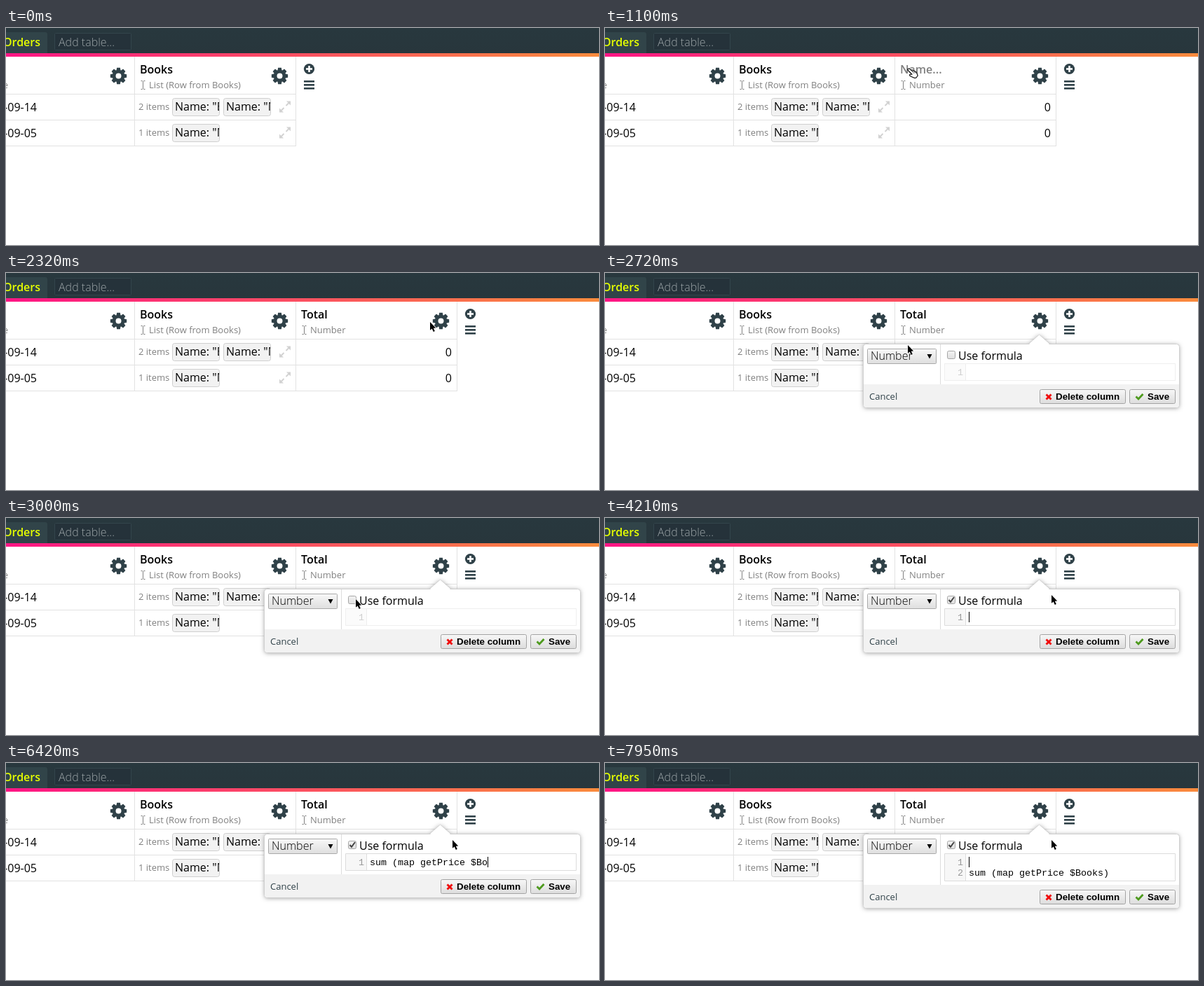
Write an HTML page with a canvas that moves like this. It is 846 px wide and 310 px high and loops after 8000 ms.

```html
<!DOCTYPE html>
<html lang="en">
<head>
<meta charset="utf-8">
<title>Adding a formula column</title>
<style>
html, body { margin: 0; width: 100%; height: 100%; overflow: hidden; background: #fff; }
canvas { display: block; }
</style>
</head>
<body>
<canvas id="stage" width="846" height="310"></canvas>
<script>
const ctx = document.getElementById('stage').getContext('2d');
const LOOP = 8000, DARK = '#2f4148', GRAY = '#808080';
const FORMULA = 'sum (map getPrice $Books)';
const sans = (size, weight = 400) => `${weight} ${size}px "Open Sans", sans-serif`;
const MONO = '13.33px "Liberation Mono", monospace';
const BUTTON = 'bold 13.33px "Liberation Sans", sans-serif';

// [first key, last key, characters]
const TITLE_KEYS = [[1620, 1840, 5]];
const FORMULA_KEYS = [
  [4450, 4700, 5], [4850, 4980, 4], [5240, 5800, 9], [6010, 6010, 1],
  [6270, 6420, 2], [6480, 6590, 3], [6730, 6730, 1]
];
const WORD_STOPS = [24, 19, 18, 9, 5, 4, 0];

// [time, x, y, shape from here on]
const POINTER = [
  [400, 440, 52, 'hand'], [480, 425, 47, 'hand'], [740, 425, 47, 'hand'],
  [820, 431, 57, 'hand'], [1100, 431, 57, 'hand'], [1160, 437, 58, 'beam'],
  [1240, 449, 60, 'beam'], [2010, 449, 60, 'beam'], [2080, 472, 64, 'arrow'],
  [2320, 605, 70, 'arrow'], [2380, 616, 69, 'hand'], [2530, 616, 69, 'hand'],
  [2580, 590, 80, 'arrow'], [2790, 355, 114, 'arrow'], [3000, 499, 116, 'arrow'],
  [3080, 495, 116, 'arrow'], [3260, 495, 116, 'arrow'], [3350, 519, 132, 'beam'],
  [3480, 555, 141, 'beam'], [3690, 555, 141, 'beam'], [3770, 580, 129, 'arrow'],
  [3950, 637, 110, 'arrow']
];

function typed(groups, t) {
  let n = 0;
  for (const [from, to, count] of groups) {
    if (t < from) break;
    n += t >= to ? count : 1 + Math.floor((t - from) / (to - from) * (count - 1));
  }
  return n;
}

function rect(x, y, w, h, color) {
  ctx.fillStyle = color;
  ctx.fillRect(x, y, w, h);
}

function box(x, y, w, h, r, fill, stroke) {
  ctx.beginPath();
  ctx.roundRect(x + .5, y + .5, w - 1, h - 1, r);
  ctx.fillStyle = fill;
  ctx.fill();
  ctx.strokeStyle = stroke;
  ctx.lineWidth = 1;
  ctx.stroke();
}

function text(str, x, y, font, color = '#000', align = 'left') {
  ctx.font = font;
  ctx.fillStyle = color;
  ctx.textAlign = align;
  ctx.fillText(str, x, y);
}

function trace(points, close) {
  ctx.beginPath();
  for (let i = 0; i < points.length; i += 2) ctx.lineTo(points[i], points[i + 1]);
  if (close) ctx.closePath();
}

function line(points, color, width) {
  trace(points);
  ctx.strokeStyle = color;
  ctx.lineWidth = width;
  ctx.stroke();
}

function shade(y, h, top, bottom) {
  const g = ctx.createLinearGradient(0, y, 0, y + h);
  g.addColorStop(0, top);
  g.addColorStop(1, bottom);
  return g;
}

function gear(x, y) {
  ctx.save();
  ctx.translate(x, y);
  ctx.fillStyle = DARK;
  ctx.beginPath();
  for (let i = 0; i < 8; i++) {
    const a = i * Math.PI / 4;
    for (const [r, d] of [[8.8, -.34], [11.9, -.2], [11.9, .2], [8.8, .34]])
      ctx.lineTo(r * Math.cos(a + d), r * Math.sin(a + d));
  }
  ctx.closePath();
  ctx.moveTo(4, 0);
  ctx.arc(0, 0, 4, 0, 7);
  ctx.fill('evenodd');
  ctx.restore();
}

function typeIcon(x) {
  line([x - 3, 75.5, x - 1, 75.5, x, 76.5, x + 1, 75.5, x + 3, 75.5], GRAY, 1);
  line([x, 76, x, 87], GRAY, 1);
  line([x - 3, 87.5, x - 1, 87.5, x, 86.5, x + 1, 87.5, x + 3, 87.5], GRAY, 1);
}

function expandIcon(x, y) {
  ctx.fillStyle = '#d2d2d2';
  for (const s of [1, -1]) {
    trace([x + 8 * s, y - 8 * s, x + 8 * s, y - 2 * s, x + 2 * s, y - 8 * s], true);
    ctx.fill();
    line([x + 1.5 * s, y - 1.5 * s, x + 6 * s, y - 6 * s], '#d2d2d2', 2);
  }
}

function chip(x, y, label) {
  box(x, y, 68, 26, 3, '#f2f2f2', '#cfcfcf');
  ctx.save();
  ctx.beginPath();
  ctx.rect(x, y, 67, 26);
  ctx.clip();
  text(label, x + 4, y + 18, sans(16));
  ctx.restore();
}

function topBar() {
  rect(0, 0, 846, 36, shade(0, 36, '#28383e', '#28363c'));
  ctx.beginPath();
  ctx.roundRect(-10, 6, 69, 30, [0, 3, 0, 0]);
  ctx.fillStyle = '#314449';
  ctx.fill();
  text('Orders', 49, 26, sans(16, 600), '#e6ff00', 'right');
  box(69, 7, 110, 25, 1, '#25323a', '#33454c');
  text('Add table...', 75, 26, sans(16, 300), '#9aa3a6');
  const g = ctx.createLinearGradient(0, 0, 846, 0);
  g.addColorStop(0, '#ff1585');
  g.addColorStop(1, '#fb8b3c');
  rect(0, 36, 846, 5, g);
}

function table(added) {
  const right = added ? 643 : 413;
  for (const y of [94, 131, 168]) rect(0, y, right + 1, 1, '#e2e2e2');
  for (const x of [183, 413, 643]) if (x <= right) rect(x, 41, 1, 128, '#e2e2e2');

  text('Date', 3, 86, sans(13), GRAY, 'right');
  text('-09-14', 44, 119, sans(16), '#000', 'right');
  text('-09-05', 44, 156, sans(16), '#000', 'right');
  gear(160.5, 68.5);

  text('Books', 191, 65, sans(16, 600));
  typeIcon(195.5);
  text('List (Row from Books)', 204, 86, sans(13), GRAY);
  gear(390.5, 68.5);
  text('2 items', 189, 117, sans(13), GRAY);
  text('1 items', 189, 154, sans(13), GRAY);
  chip(237, 100, 'Name: "B');
  chip(310, 100, 'Name: "M');
  chip(237, 137, 'Name: "M');
  expandIcon(398, 112.5);
  expandIcon(398, 149.5);

  const x = right + 19.5;
  ctx.beginPath();
  ctx.arc(x, 58.5, 7.6, 0, 7);
  ctx.fillStyle = DARK;
  ctx.fill();
  rect(x - 4.5, 57.2, 9, 2.6, '#fff');
  rect(x - 1.3, 54, 2.6, 9, '#fff');
  for (const y of [75, 80, 85]) rect(x - 7.5, y, 15, 2.6, DARK);
}

function newColumn(t) {
  const title = 'Total'.slice(0, typed(TITLE_KEYS, t));
  text(title || 'Name...', 421, 65, sans(16, 600), title ? '#000' : GRAY);
  if (t >= 1460 && t < 2010) {
    ctx.strokeStyle = 'rgba(229,151,0,.8)';
    ctx.lineWidth = 2;
    ctx.strokeRect(420, 47, 172, 24);
    rect(421 + (title ? Math.round(ctx.measureText(title).width) : 0), 48, 1, 22, '#000');
  }
  typeIcon(425.5);
  text('Number', 434, 86, sans(13), GRAY);
  gear(620.5, 68.5);
  for (const y of [119, 156]) text('0', 636, y, sans(16), '#000', 'right');
}

function button(x, y, w, label, labelX) {
  box(x, y, w, 21, 2, shade(y, 21, '#f8f8f8', '#dcdcdc'), '#a3a3a3');
  text(label, labelX, y + 15, BUTTON);
}

function editor(t, grow) {
  const on = t >= 3260;
  ctx.globalAlpha = on ? 1 : .45;
  box(484, 129, 330, 25 + grow, 0, '#fff', '#dcdcdc');
  rect(485, 130, 30, 23 + grow, '#f7f7f7');
  rect(514, 130, 1, 23 + grow, '#ddd');
  text('1', 511, 146, MONO, '#999', 'right');
  if (grow) text('2', 511, 161, MONO, '#999', 'right');
  ctx.globalAlpha = 1;

  const n = typed(FORMULA_KEYS, t);
  text(FORMULA.slice(0, n), 519, 146 + grow, MONO);
  if (t < 4210 || (t >= 6990 && t < 7140)) return;
  const stop = Math.min(6, Math.floor((t - 7140) / 71.6));
  const col = t < 7140 ? n : WORD_STOPS[stop];
  rect(519 + col * 8, t >= 7710 && t < 7950 ? 149 : 134, 1, 15, '#000');
}

function checkbox(t) {
  const on = t >= 3260;
  box(488, 111, 12, 12, 2, shade(111, 12, '#f4f4f4', '#dedede'), '#a5a5a5');
  if (on) line([490.5, 117, 493, 119.8, 498, 113], '#444', 2);
  if (on && t < 3690) {
    ctx.strokeStyle = 'rgba(229,151,0,.8)';
    ctx.lineWidth = 1;
    ctx.strokeRect(487.5, 110.5, 13, 13);
  }
}

function popup(t) {
  const grow = t >= 7710 ? 15 : 0, foot = 159 + grow;
  ctx.save();
  ctx.beginPath();
  ctx.roundRect(369, 101.5, 450, 90.5 + grow, 4);
  ctx.moveTo(604, 102);
  ctx.lineTo(619.5, 88);
  ctx.lineTo(635, 102);
  ctx.shadowColor = 'rgba(0,0,0,.4)';
  ctx.shadowBlur = 6;
  ctx.shadowOffsetY = 1;
  ctx.fillStyle = '#fff';
  ctx.fill();
  ctx.restore();
  box(368, 101, 452, 92 + grow, 4, '#fff', '#d0d0d0');
  ctx.fillStyle = '#fff';
  trace([604, 103, 619.5, 88.5, 635, 103], true);
  ctx.fill();
  line([604, 101.5, 619.5, 88, 635, 101.5], '#d4d4d4', 1);
  ctx.beginPath();
  ctx.roundRect(369, foot, 450, 33, [0, 0, 4, 4]);
  ctx.fillStyle = '#f2f2f2';
  ctx.fill();
  rect(478, 102, 1, foot - 102, '#ddd');

  box(374, 108, 99, 22, 1, shade(108, 22, '#f8f8f8', '#dedede'), '#a9a9a9');
  text('Number', 379, 124, sans(16, 300));
  ctx.fillStyle = '#000';
  trace([459.5, 116, 466.5, 116, 463, 122.5], true);
  ctx.fill();

  checkbox(t);
  text('Use formula', 504, 124, sans(16));
  editor(t, grow);

  text('Cancel', 377, foot + 22, sans(13), DARK);
  button(620, foot + 7, 123, 'Delete column', 643);
  button(748, foot + 7, 66, 'Save', 774);
  const y = foot + 18;
  line([629.5, y - 3.5, 636.5, y + 3.5], '#f00d0d', 2.8);
  line([636.5, y - 3.5, 629.5, y + 3.5], '#f00d0d', 2.8);
  line([757.5, y - .5, 761, y + 3, 767.5, y - 4], '#4d9a1d', 2.8);
}

const shapes = {
  arrow() {
    trace([0, 0, 0, 11.8, 2.7, 9.4, 4.8, 14, 6.8, 13.1, 4.8, 8.7, 8.2, 8.4], true);
    ctx.strokeStyle = '#fff';
    ctx.lineWidth = 1.4;
    ctx.stroke();
    ctx.fillStyle = '#000';
    ctx.fill();
  },
  hand() {
    trace([1, 1.5, 3, .8, 7.5, 4.6, 9, 4.1, 11, 4.8, 12.6, 5.6, 13.8, 7.4, 15.2, 11,
      12.8, 14.3, 10.5, 14.4, 6.2, 12.6, 4, 11.4, 3.4, 9.8, 5, 9.2, 6.8, 9, 1, 3.2], true);
    ctx.fillStyle = '#fff';
    ctx.fill();
    ctx.strokeStyle = '#000';
    ctx.lineWidth = 1.1;
    ctx.stroke();
    line([8, 5.5, 9.8, 7.6], '#000', .8);
    line([10.4, 5.4, 11.8, 7.4], '#000', .8);
  },
  beam() {
    for (const [color, width] of [['#fff', 3], ['#000', 1]]) {
      line([-3, -7.5, -1, -7.5, .5, -6.5, 2, -7.5, 4, -7.5], color, width);
      line([.5, -7, .5, 7], color, width);
      line([-3, 7.5, -1, 7.5, .5, 6.5, 2, 7.5, 4, 7.5], color, width);
    }
  }
};

function pointer(t) {
  const i = POINTER.findLastIndex(key => t >= key[0]);
  if (i < 0) return;
  const [from, x, y, shape] = POINTER[i];
  const [to, x2, y2] = POINTER[i + 1] || [LOOP, x, y];
  const p = (t - from) / (to - from);
  ctx.save();
  ctx.translate(Math.round(x + (x2 - x) * p), Math.round(y + (y2 - y) * p));
  shapes[shape]();
  ctx.restore();
}

function frame() {
  const t = performance.now() % LOOP;
  rect(0, 0, 846, 310, '#fff');
  topBar();
  table(t >= 1100);
  if (t >= 1100) newColumn(t);
  if (t >= 2530) popup(t);
  pointer(t);
  requestAnimationFrame(frame);
}
frame();
</script>
</body>
</html>
```
